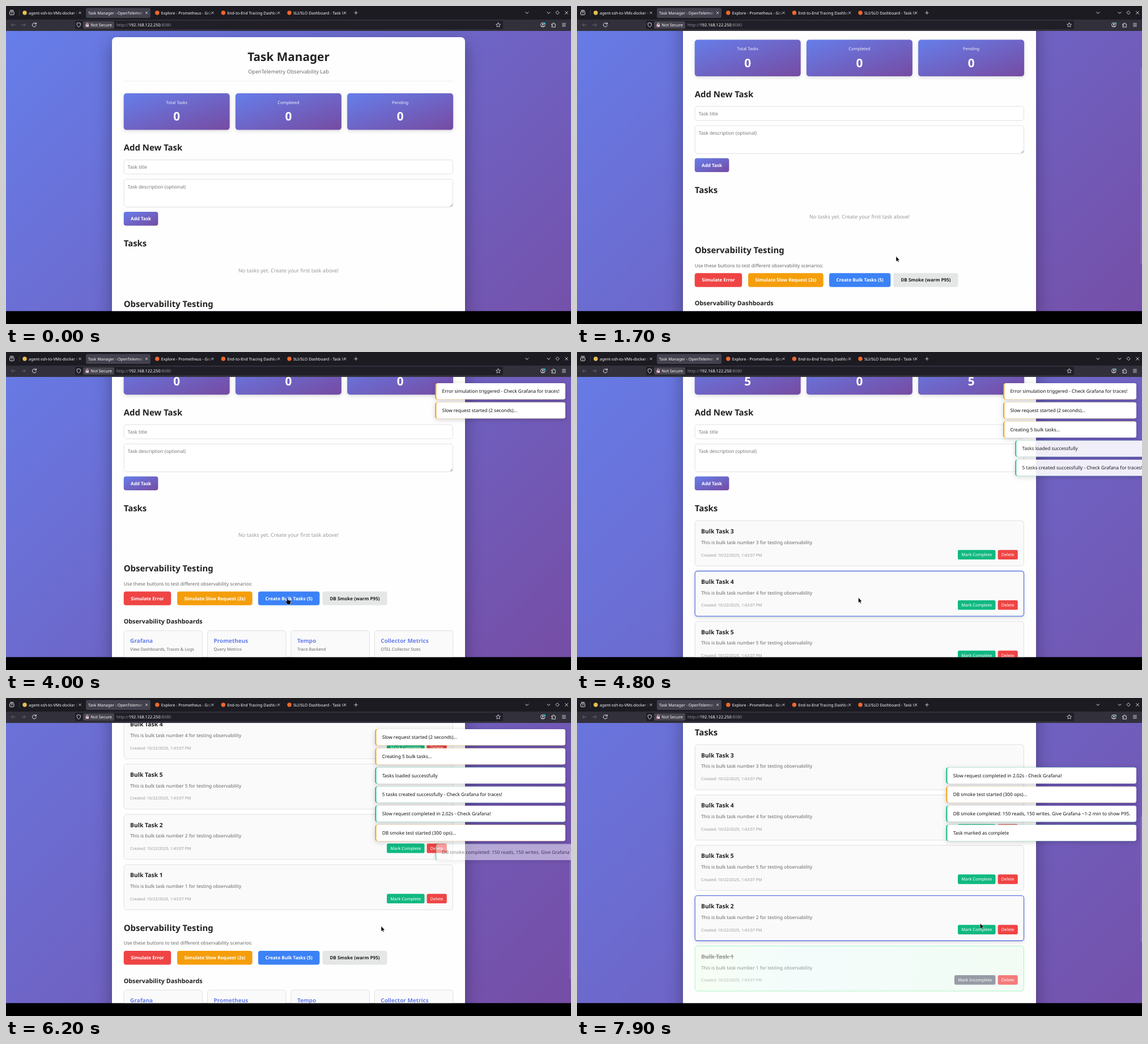
Animation of 997x561 px, one loop 8000 ms. Source, as an HTML page:

```html
<!DOCTYPE html>
<html lang="en">
<head>
<meta charset="utf-8">
<title>Task Manager</title>
<style>
html, body { margin: 0; width: 100%; height: 100%; overflow: hidden; background: #000; }
svg { display: block; width: 997px; height: 561px; }
text { font-family: "Noto Sans", "Open Sans", sans-serif; text-rendering: geometricPrecision; white-space: pre; }
.panel { filter: drop-shadow(0 10px 15px rgba(0,0,0,.32)); }
.soft { filter: drop-shadow(0 2px 3px rgba(0,0,0,.14)); }
.lift { filter: drop-shadow(0 2px 2px rgba(0,0,0,.3)); }
.toast { filter: drop-shadow(0 2px 4px rgba(0,0,0,.18)); }
</style>
</head>
<body>
<svg id="stage" viewBox="0 0 997 561">
  <defs>
    <linearGradient id="brand" gradientUnits="objectBoundingBox" x1="0" y1="0" x2="1" y2="1">
      <stop stop-color="#667eea"/><stop offset="1" stop-color="#764ba2"/>
    </linearGradient>
    <linearGradient id="sky" gradientUnits="userSpaceOnUse">
      <stop stop-color="#667eea"/><stop offset="1" stop-color="#764ba2"/>
    </linearGradient>
    <linearGradient id="done" x1="0" y1="0" x2="1" y2="0">
      <stop stop-color="#f4fff0"/><stop offset=".3" stop-color="#effcfb"/><stop offset="1" stop-color="#eefcf0"/>
    </linearGradient>
    <linearGradient id="fade">
      <stop offset=".9" stop-color="#fbfbfe"/><stop offset="1" stop-color="#fbfbfe" stop-opacity=".2"/>
    </linearGradient>
    <clipPath id="view"><rect y="44" width="997" height="494.5"/></clipPath>
  </defs>
</svg>
<script>
const LOOP = 8000, TOP = 44, VIEW = 494;
const LEFT = 207.7, RIGHT = 789, REM = 8.308;
const RED = '#ef4444', ORANGE = '#f59e0b', GREEN = '#10b981', BLUE = '#3b82f6';
const stage = document.getElementById('stage');

function add(parent, tag, attrs) {
  const el = document.createElementNS('http://www.w3.org/2000/svg', tag);
  for (const k in attrs) el.setAttribute(k, attrs[k]);
  parent.append(el);
  return el;
}
const group = (parent, attrs = {}) => add(parent, 'g', attrs);
const rect = (parent, x, y, width, height, rx, fill, more = {}) =>
  add(parent, 'rect', { x, y, width, height, rx, fill, ...more });
const line = (parent, d, stroke = '#e6e6ee', width = 1) =>
  add(parent, 'path', { d, stroke, 'stroke-width': width, fill: 'none', 'stroke-linecap': 'round', 'stroke-linejoin': 'round' });
const dot = (parent, cx, cy, r, fill, more = {}) => add(parent, 'circle', { cx, cy, r, fill, ...more });
function label(parent, x, y, str, size, fill, weight = 400, anchor = 'start') {
  const el = add(parent, 'text', { x, y, fill, 'font-size': size, 'font-weight': weight, 'text-anchor': anchor });
  el.textContent = str;
  return el;
}
function button(parent, x, y, w, h, str, fill, size, weight, color = '#fff') {
  const g = group(parent);
  rect(g, x, y, w, h, h > 20 ? 4 : 2.6, fill);
  label(g, x + w / 2, y + h / 2 + size * .36, str, size, color, weight, 'middle');
  return g;
}
const box = (parent, x, y, w, h, fill) =>
  rect(parent, x + .5, y + .5, w - 1, h - 1, 4.5, fill, { stroke: '#e0e0e6', 'stroke-width': 1 });

// Page
const view = group(stage, { 'clip-path': 'url(#view)' });
const page = group(view);
const sky = rect(page, 0, TOP, 997, 707, 0, 'url(#sky)');
const skyFill = document.getElementById('sky');
const panel = rect(page, 187, 55, 623, 685, 7, '#fefefe', { class: 'panel' });

label(page, 498.5, 97.4, 'Task Manager', 2.5 * REM, '#222', 700, 'middle');
label(page, 498.5, 118.8, 'OpenTelemetry Observability Lab', 1.1 * REM, '#6a6a6a', 400, 'middle');
rect(page, LEFT, 132.2, RIGHT - LEFT, 1, 0, '#ececec');

const counts = ['Total Tasks', 'Completed', 'Pending'].map((name, i) => {
  const x = LEFT + i * 197.2;
  rect(page, x, 154, 187, 64.6, 5, 'url(#brand)', { class: 'soft' });
  label(page, x + 93.5, 172.8, name, .9 * REM, '#fff', 400, 'middle').setAttribute('opacity', .9);
  return label(page, x + 93.5, 202.2, '0', 2.5 * REM, '#fff', 700, 'middle');
});

const heading = (parent, y, str) => label(parent, LEFT, y, str, 1.8 * REM, '#222', 700);
heading(page, 255.4, 'Add New Task');
box(page, LEFT, 271, RIGHT - LEFT, 26, '#fff');
label(page, 214.8, 287.2, 'Task title', REM, '#757575');
box(page, LEFT, 305, RIGHT - LEFT, 50.2, '#fff');
label(page, 214.8, 321.6, 'Task description (optional)', REM, '#757575');
line(page, 'M783.8 353.6l4-4M786 353.6l1.8-1.8', '#777', .7);
button(page, LEFT, 363, 60.7, 24.4, 'Add Task', 'url(#brand)', .975 * REM, 600);
heading(page, 424.4, 'Tasks');
const empty = label(page, 498.5, 469.7, 'No tasks yet. Create your first task above!', 1.1 * REM, '#999', 400, 'middle');

// Task list
const list = group(page);
const cards = [3, 4, 5, 2, 1].map((n, i) => {
  const y = 440.6 + i * 88.78;
  const g = group(list);
  const frame = box(g, LEFT, y, RIGHT - LEFT, 80.6, '#fafafb');
  const title = label(g, 219, y + 22.8, `Bulk Task ${n}`, 1.25 * REM, '#222', 600);
  label(g, 219, y + 41.6, `This is bulk task number ${n} for testing observability`, REM, '#666');
  label(g, 219, y + 63.4, 'Created: 10/22/2025, 1:43:07 PM', .85 * REM, '#999');
  const mark = button(g, 672, y + 52, 66.5, 16.8, 'Mark Complete', GREEN, .9 * REM, 400);
  const undo = button(g, 666, y + 52, 72.5, 16.8, 'Mark Incomplete', '#6b7280', .9 * REM, 400);
  button(g, 742.6, y + 52, 35.2, 16.8, 'Delete', RED, .9 * REM, 400);
  return { g, frame, title, mark, undo };
});

// Testing section
const lower = group(page);
heading(lower, 530.8, 'Observability Testing');
label(lower, LEFT, 555, 'Use these buttons to test different observability scenarios:', REM, '#666');
const tests = [
  [LEFT, 83.5, 'Simulate Error', RED],
  [302, 132.7, 'Simulate Slow Request (2s)', ORANGE],
  [445, 108.4, 'Create Bulk Tasks (5)', BLUE],
  [558.4, 114.2, 'DB Smoke (warm P95)', '#e5e6e6', '#222']
].map(([x, w, str, fill, color]) => button(lower, x, 565.8, w, 24.4, str, fill, .975 * REM, 600, color));
label(lower, LEFT, 622.8, 'Observability Dashboards', 1.3 * REM, '#222', 700);
[['Grafana', 'View Dashboards, Traces & Logs'], ['Prometheus', 'Query Metrics'],
 ['Tempo', 'Trace Backend'], ['Collector Metrics', 'OTEL Collector Stats']].forEach(([name, note], i) => {
  const x = LEFT + i * 147.4;
  box(lower, x, 634.4, 139.4, 49, '#fafafb');
  label(lower, x + 11.4, 656.5, name, 1.2 * REM, '#667eea', 700);
  label(lower, x + 11.4, 670.7, note, .9 * REM, '#666');
});

const thumb = rect(view, 994.8, TOP, 1.4, 10, .7, 'rgba(255,255,255,.2)');

// Notifications: start time, colour, message
const toasts = [
  [2800, ORANGE, 'Error simulation triggered - Check Grafana for traces!'],
  [3500, ORANGE, 'Slow request started (2 seconds)...'],
  [4100, ORANGE, 'Creating 5 bulk tasks...'],
  [4700, GREEN, 'Tasks loaded successfully'],
  [4700, GREEN, '5 tasks created successfully - Check Grafana for traces!'],
  [5520, GREEN, 'Slow request completed in 2.02s - Check Grafana!'],
  [5750, ORANGE, 'DB smoke test started (300 ops)...'],
  [6200, GREEN, 'DB smoke completed: 150 reads, 150 writes. Give Grafana ~1-2 min to show P95.'],
  [7100, GREEN, 'Task marked as complete']
].map(([start, color, str]) => {
  const g = group(view, { class: 'toast' });
  const edge = rect(g, 0, 0, 10, 28.4, 4, color);
  const body = rect(g, 2, 0, 10, 28.4, 3.4, '#fff');
  const text = label(g, 12.3, 17.2, str, REM, '#111');
  return { start, g, edge, body, width: text.getComputedTextLength() + 22.8 };
});

// Browser frame
const bar = group(stage);
rect(bar, 0, 0, 997, 24, 0, '#1c1b22');
rect(bar, 0, 24, 997, 20, 0, '#32313b');
rect(bar, 141, 3.5, 114, 17.5, 2.5, '#42414d');
rect(bar, 122, 26, 755, 15, 2.5, '#201f27');
rect(bar, 136, 27, 55, 13, 2, '#46454f');
rect(bar, 6.5, 9.5, 7.5, 6, 1.3, 'none', { stroke: '#e6e6ee', 'stroke-width': 1 });
line(bar, 'M7.5 7.6h5.5M9 12h2.6');
line(bar, 'M23.5 7v10', '#55545f', .6);
[['agent-ssh-to-VMs-docker i', 40, 130.5, '#e8c050'], ['Task Manager - OpenTelemet', 145, 248],
 ['Explore - Prometheus - Gra', 273.8, 364.5, '#f0682a'], ['End-to-End Tracing Dashbo', 390.4, 481.3, '#f0682a'],
 ['SLI/SLO Dashboard - Task M', 507, 598.3, '#f0682a']].forEach(([str, x, close, icon]) => {
  if (icon) dot(bar, x - 7, 12, 3.7, icon);
  label(bar, x, 14.6, str, 7, 'url(#fade)');
  line(bar, `M${close - 1.8} 10.2l3.6 3.6m0-3.6l-3.6 3.6`, '#e6e6ee', .8);
});
line(bar, 'M617.5 9.2v5.6M614.7 12h5.6', '#e6e6ee', .8);
line(bar, 'M916.8 10.8l2.5 2.5 2.5-2.5M955 10.8l2.5 2.5 2.5-2.5');
line(bar, 'M973.2 8.9l3 3-3 3-3-3zM986.6 9.4l5 5m0-5l-5 5', '#e6e6ee', .9);
line(bar, 'M16.2 33.3H9.6m2.8-2.8l-2.8 2.8 2.8 2.8M27.6 33.3h6.6m-2.8-2.8l2.8 2.8-2.8 2.8', '#6b6a75', .9);
line(bar, 'M52.8 31.2a3.5 3.5 0 1 0 .6 3M53.4 29.4v2.4h-2.4');
line(bar, 'M128.3 29.6l3.2 1.2c0 3.4-1 5.3-3.2 6.6-2.2-1.3-3.2-3.2-3.2-6.6z', '#e6e6ee', .9);
rect(bar, 140.6, 32.6, 5.4, 4, .8, '#e6e6ee');
line(bar, 'M141.8 32.4v-1a1.5 1.5 0 0 1 3 0v1', '#e6e6ee', .9);
line(bar, 'M140 37.2l7-7.4', '#e84a5f', 1);
label(bar, 149.3, 35.9, 'Not Secure', 7.3, '#fbfbfe');
const url = label(bar, 195, 35.9, '', 7.3, '#8f8e99');
[['http://'], ['192.168.122.250', '#fbfbfe'], [':8080']].forEach(([str, fill]) => {
  add(url, 'tspan', fill ? { fill } : {}).textContent = str;
});
line(bar, 'M868.6 29.4l1.2 2.6 2.8.3-2.1 1.9.6 2.8-2.5-1.4-2.5 1.4.6-2.8-2.1-1.9 2.8-.3z', '#e6e6ee', .8);
dot(bar, 947.3, 33.3, 3.8, 'none', { stroke: '#e6e6ee', 'stroke-width': .9 });
dot(bar, 947.3, 32.2, 1.3, '#e6e6ee');
line(bar, 'M945.2 35.8q2.1-2 4.2 0', '#e6e6ee', .9);
dot(bar, 950.6, 30.4, 1.5, '#28c3d7');
line(bar, 'M963 31.8h2v-.8a1.2 1.2 0 0 1 2.4 0v.8h2v5.4H963v-1.8h.9a1 1 0 0 0 0-2H963z', '#e6e6ee', .9);
line(bar, 'M981.6 30.8h5.8M981.6 33.3h5.8M981.6 35.8h5.8', '#e6e6ee', .9);
rect(stage, 0, 538.5, 997, 23, 0, '#000');

// Pointer
const pointer = group(stage);
const pen = { fill: '#000', stroke: '#fff', 'stroke-width': .5, 'stroke-linejoin': 'round' };
const arrow = add(pointer, 'path', { d: 'M0 0V9.4L2.1 7.5 3.6 10.6 5 10 3.6 6.9H6.4Z', ...pen });
const hand = add(pointer, 'path', {
  d: 'M-1 .8Q0-.6 1 .8V4.4L5.4 5.4Q6.4 5.8 6.2 7L5.4 10V12H-.6V10.6L-3.6 7.4Q-3.8 6-2.4 6.2L-1 7.2Z', ...pen });

const easeOut = p => 1 - (1 - p) ** 3;
const easeInOut = p => p * p * (3 - 2 * p);
const clamp = v => Math.max(0, Math.min(1, v));

// Value of a [time, value...] track at time t
function track(keys, t, col, ease) {
  let i = keys.length - 1;
  while (i > 0 && keys[i][0] > t) i--;
  const a = keys[i], b = keys[i + 1];
  if (!b || t < a[0]) return a[col];
  return a[col] + (b[col] - a[col]) * ease((t - a[0]) / (b[0] - a[0]));
}

const SCROLL = [[1000, 0], [1250, 47.3], [1350, 47.3], [1600, 94.5], [1800, 94.5], [2050, 143.4],
  [4850, 143.4], [5350, 502.2], [7250, 502.2], [7700, 358.8]];
const PATH = [[200, 590, 570], [900, 563, 441.5], [1950, 563, 441.5], [2600, 237.5, 439.3], [2900, 237.5, 439.3],
  [3350, 368, 437], [3600, 368, 437], [3950, 496.5, 433.2], [5100, 496.5, 433.2], [5400, 593.6, 432.5],
  [5650, 612, 456], [5850, 612, 456], [6500, 701.8, 360], [7500, 701.8, 360], [7850, 711.4, 397.6]];
const HAND = [[2500, 3000], [3200, 4700], [5600, 5950], [6450, 7250]];
const LIFTS = [[tests[0], 2550, 2950], [tests[1], 3250, 3700], [tests[3], 5600, 5950], [cards[4].mark, 6450, 7100]];
const HOVER = { 1: [4700, 5450], 4: [6450, 7750], 3: [7750, LOOP] };
const within = (t, [from, to]) => t >= from && t < to;
const show = (el, on) => { el.style.display = on ? '' : 'none'; };
const move = (el, x, y) => el.setAttribute('transform', `translate(${x} ${y})`);
const set = (el, attrs) => { for (const k in attrs) el.setAttribute(k, attrs[k]); };

function drawPage(t) {
  const full = t >= 4700, done = t >= 7100;
  const extra = full ? 382.5 : 0, height = 707 + extra;
  const scroll = track(SCROLL, t, 1, easeOut);
  move(page, 0, -scroll);
  move(lower, 0, extra);
  set(sky, { height });
  set(panel, { height: 685 + extra });
  const reach = (997 + height) / 4, mid = TOP + height / 2;
  set(skyFill, { x1: 498.5 - reach, y1: mid - reach, x2: 498.5 + reach, y2: mid + reach });
  show(empty, !full);
  show(list, full);
  const numbers = !full ? [0, 0, 0] : done ? [5, 1, 4] : [5, 0, 5];
  counts.forEach((el, i) => { el.textContent = numbers[i]; });

  cards.forEach((c, i) => {
    const hover = HOVER[i] && within(t, HOVER[i]), ticked = done && i === 4;
    set(c.frame, {
      fill: ticked ? 'url(#done)' : '#fafafb',
      stroke: hover ? '#5f78e2' : ticked ? '#86efac' : '#e0e0e6',
      'stroke-width': hover ? 1.3 : 1,
      class: hover ? 'soft' : ''
    });
    set(c.g, { opacity: ticked ? .7 : 1 });
    set(c.title, { 'text-decoration': ticked ? 'line-through' : 'none', fill: ticked ? '#777' : '#222' });
    show(c.mark, !ticked);
    show(c.undo, ticked);
  });
  LIFTS.forEach(([el, from, to]) => {
    const on = within(t, [from, to]);
    move(el, 0, on ? -.8 : 0);
    set(el, { class: on ? 'lift' : '' });
  });

  show(thumb, within(t, [1000, 2500]) || t >= 4900);
  set(thumb, { y: TOP + scroll * VIEW / height, height: VIEW * VIEW / height });
}

function drawToasts(t) {
  const live = toasts.filter(n => within(t, [n.start, n.start + 3300]));
  const width = Math.max(0, ...live.map(n => n.width));
  toasts.forEach(n => show(n.g, live.includes(n)));
  live.forEach((n, i) => {
    const age = t - n.start;
    const shown = easeOut(clamp((age + 60) / 300)) * (1 - easeInOut(clamp((age - 3000) / 200)));
    move(n.g, 987 - width + 207 * (1 - shown), 55 + 33.75 * i);
    set(n.g, { opacity: shown });
    set(n.edge, { width });
    set(n.body, { width: width - 2 });
  });
}

function drawPointer(t) {
  const isHand = HAND.some(span => within(t, span));
  move(pointer, track(PATH, t, 1, easeInOut), track(PATH, t, 2, easeInOut));
  show(hand, isHand);
  show(arrow, !isHand);
}

function tick() {
  const t = Math.floor(performance.now() % LOOP / 100) * 100;
  drawPage(t);
  drawToasts(t);
  drawPointer(t);
  requestAnimationFrame(tick);
}
tick();
</script>
</body>
</html>
```
